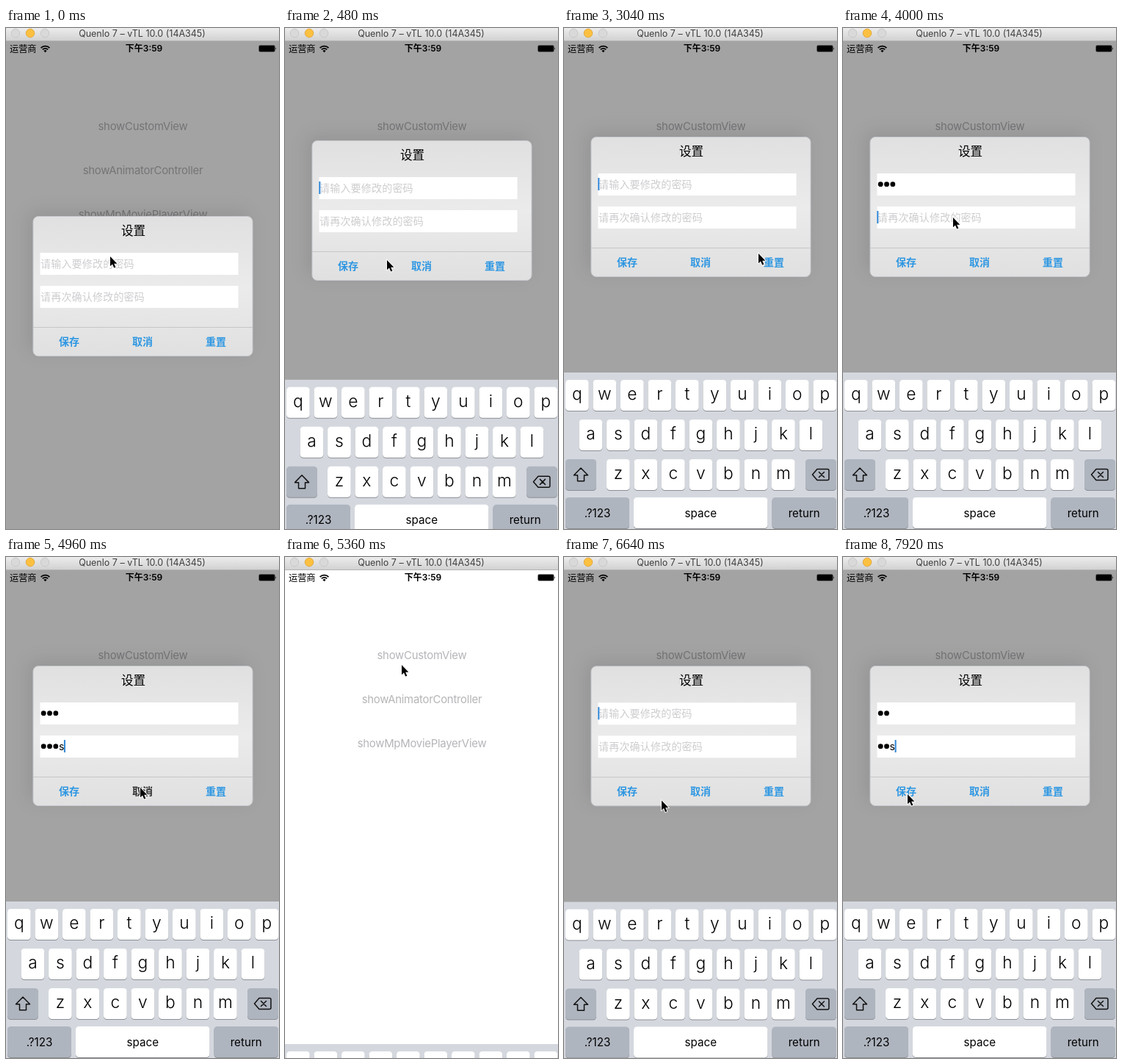
An HTML page that plays this animation: 372 px wide and 682 px high, repeating every 8000 ms.

```html
<!DOCTYPE html>
<html lang="zh-CN">
<head>
<meta charset="utf-8">
<title>Dialog demo</title>
<style>
  html, body { margin: 0; width: 100%; height: 100%; overflow: hidden; background: #fff; }
  svg { display: block; width: 100%; height: 100%; }
  text { font-family: Inter, "Noto Sans CJK SC", "Noto Sans CJK", sans-serif; white-space: pre; }
  .mid { text-anchor: middle; }
  .link { font-size: 14.9px; letter-spacing: -.25px; fill: #b5b5b9; }
  .key { font-size: 22.8px; font-weight: 350; }
  .wide { font-size: 15.2px; }
  .btn { font-size: 14px; font-weight: 700; fill: #2e97e2; }
  .hint { font-size: 14px; letter-spacing: .2px; fill: #cdcdd0; }
  .shadow { filter: blur(12px); }
  .icon { fill: none; stroke: #111; stroke-width: 1.5; stroke-linejoin: round; stroke-linecap: round; }
</style>
</head>
<body>
<svg id="stage" viewBox="0 0 372 682">
  <defs>
    <linearGradient id="bar" x2="0" y2="1">
      <stop offset="0" stop-color="#ececec"/><stop offset="1" stop-color="#d2d2d2"/>
    </linearGradient>
    <linearGradient id="panel" x2="0" y2="1">
      <stop offset="0" stop-color="#e0e0e0"/><stop offset=".5" stop-color="#ebebeb"/>
      <stop offset="1" stop-color="#e0e0e0"/>
    </linearGradient>
  </defs>
  <rect width="372" height="682" fill="#fff"/>
  <g id="links"></g>
  <rect id="dim" y="17" width="372" height="665"/>

  <g id="status">
    <text x="5" y="32.5" font-size="12.2">运营商</text>
    <g fill="none" stroke="#000" stroke-width="1.8">
      <path d="M47.6 27.2A8.2 8.2 0 0 1 59.4 27.2"/>
      <path d="M49.8 29.4A5.2 5.2 0 0 1 57.2 29.4"/>
    </g>
    <path d="M53.5 33.2L51.4 31A3 3 0 0 1 55.6 31Z"/>
    <text class="mid" x="188" y="32.3" font-size="12" font-weight="600">下午3:59</text>
    <rect x="344.5" y="23.5" width="22" height="9" rx="2" fill="none" stroke="#000" stroke-opacity=".5" stroke-width=".8"/>
    <rect x="345" y="24" width="21" height="8" rx="1.2"/>
    <path d="M367.3 26.3Q369 28 367.3 29.7Z"/>
  </g>

  <g id="dialog">
    <rect class="shadow" x="31" y="250" width="299" height="190" rx="7" fill-opacity=".09"/>
    <rect x="37" y="256.5" width="299" height="190" rx="7" fill="url(#panel)" stroke="#c8cad0"/>
    <text class="mid" x="173.5" y="282" font-size="16.6">设置</text>
    <g id="fields"></g>
    <rect id="caret" width="2" height="17" fill="#2f86d6"/>
    <rect x="37" y="407" width="299" height="1" fill="#c6c6c6"/>
    <g id="buttons"></g>
  </g>

  <g id="board"></g>

  <rect width="372" height="17" fill="url(#bar)"/>
  <rect y="17" width="372" height="1" fill="#b4b4b4"/>
  <g stroke-width=".8">
    <circle cx="13" cy="7" r="5.8" fill="#d9d9d9" stroke="#c3c3c3"/>
    <circle cx="33" cy="7" r="5.8" fill="#fcc041" stroke="#dfa12f"/>
    <circle cx="53" cy="7" r="5.8" fill="#d9d9d9" stroke="#c3c3c3"/>
  </g>
  <text class="mid" x="185.5" y="11.6" font-size="12.5" fill="#3f3f3f">Quenlo 7 – vTL 10.0 (14A345)</text>

  <path id="mouse" d="M0 0V13.2L3 10.5L5.2 15.6L7.4 14.7L5.2 9.7H9.4Z" stroke="#fff" stroke-width="1.6" paint-order="stroke"/>
</svg>
<script>
const LOOP = 8000, STEP = 80;
const LIFT = 108, BOARD = 213;
const OPEN = 5600, CLOSE = 5010, FADE = 200;
const RISE = [215, 6190], FALL = 5139;

// [time, field], -1 for none
const focusAt = [[0, -1], [215, 0], [4000, 1], [5139, -1], [6190, 0], [7200, 1]];
const typing = [
  [[3440, 3560, 3680], [4240, 4360, 4480, 4640]],
  [[6720, 6880], [7360, 7480, 7600]]
];
// [time, x, y]
const path = [
  [0, 142, 311], [200, 142, 311], [480, 139, 316], [1200, 139, 316],
  [2900, 265, 307], [3300, 265, 307], [3900, 150, 258], [4500, 150, 258],
  [4880, 183, 314], [5060, 183, 314], [5360, 159, 147], [5460, 160, 136],
  [5640, 160, 136], [6000, 133, 333], [7000, 133, 331], [7180, 120, 262],
  [7600, 120, 262], [7880, 88, 323], [8000, 88, 323]
];

const $ = id => document.getElementById(id);
function add(parent, tag, attrs, text) {
  const el = document.createElementNS("http://www.w3.org/2000/svg", tag);
  for (const k in attrs) el.setAttribute(k, attrs[k]);
  if (text) el.textContent = text;
  return parent.appendChild(el);
}
const set = (el, k, v) => el.setAttribute(k, v);

["showCustomView", "showAnimatorController", "showMpMoviePlayerView"].forEach((s, i) =>
  add($("links"), "text", { class: "link mid", x: 186.5, y: 138.5 + 60 * i }, s));

const buttons = ["保存", "取消", "重置"].map((s, i) =>
  add($("buttons"), "text", { class: "btn mid", x: 86 + 100 * i, y: 432 }, s));

const fields = ["请输入要修改的密码", "请再次确认修改的密码"].map((s, i) => {
  const g = add($("fields"), "g", { transform: `translate(46.5 ${306 + 45 * i})` });
  add(g, "rect", { width: 270, height: 30, fill: "#fff" });
  return {
    hint: add(g, "text", { class: "hint", x: .5, y: 20 }, s),
    dots: [0, 1, 2, 3].map(n => add(g, "circle", { cx: 4.7 + 8.3 * n, cy: 14.7, r: 3.4 })),
    last: add(g, "text", { y: 19.5, "font-size": 14 }, "s")
  };
});

function key(x, y, w, label, cls, fill = "#fff") {
  const g = $("board");
  add(g, "rect", { x, y: y + 1, width: w, height: 42, rx: 4.5, fill: "#8b8e94" });
  add(g, "rect", { x, y, width: w, height: 42, rx: 4.5, fill });
  if (label) add(g, "text", { class: cls + " mid", x: x + w / 2, y: y + (cls === "key" ? 27 : 26.5) }, label);
}
add($("board"), "rect", { y: 469, width: 372, height: 213, fill: "#d4d8de" });
[["qwertyuiop", 2], ["asdfghjkl", 20.6], ["zxcvbnm", 58]].forEach(([row, x], r) =>
  [...row].forEach((c, i) => key(x + 37.5 * i, 479 + 54 * r, 31.7, c, "key")));
const grey = "#afb5bf";
key(2, 587, 42, "", "", grey);
key(329, 587, 42, "", "", grey);
key(2, 639, 87, ".?123", "wide", grey);
key(95, 639, 182.5, "space", "wide");
key(283.5, 639, 87.5, "return", "wide", grey);
[
  "M23 599L13.5 608.8H18.5V616.8H27.5V608.8H32.5Z",
  "M345 600.5H359Q361 600.5 361 602.5V613.5Q361 615.5 359 615.5H345L338.5 608Z",
  "M347.5 604.5L354.5 611.5M354.5 604.5L347.5 611.5"
].forEach(d => add($("board"), "path", { class: "icon", d }));

const clamp = u => Math.max(0, Math.min(1, u));
const ease = u => { u = clamp(u); return u * u * (3 - 2 * u); };
const spring = ms => {
  const u = Math.max(0, ms) * .01826;
  return 1 - (1 + u) * Math.exp(-u);
};

function mouseAt(t) {
  const i = Math.max(1, path.findIndex(p => p[0] >= t));
  const [t0, x0, y0] = path[i - 1], [t1, x1, y1] = path[i];
  const u = ease((t - t0) / (t1 - t0));
  return [x0 + (x1 - x0) * u, y0 + (y1 - y0) * u];
}

function draw(t) {
  const again = t >= OPEN;
  const up = spring(t - RISE[again ? 1 : 0]);
  const boardUp = again ? up : up * (1 - spring(t - FALL));
  set($("board"), "transform", `translate(0 ${BOARD * (1 - boardUp)})`);

  const shown = again ? ease((t - OPEN) / FADE) : 1 - ease((t - CLOSE) / FADE);
  const scale = again ? 1.3 - .3 * shown : .6 + .4 * shown;
  const alpha = again ? .5 + .5 * shown : shown;
  set($("dim"), "opacity", .36 * shown);
  set($("dialog"), "opacity", alpha);
  set($("dialog"), "transform",
    `translate(186.5 ${351.5 - LIFT * up}) scale(${scale}) translate(-186.5 -351.5)`);

  const [since, focus] = focusAt.filter(f => f[0] <= t).pop();
  let active = since;
  fields.forEach((f, i) => {
    const hits = typing[again ? 1 : 0][i].filter(k => k <= t);
    const n = hits.length, open = focus === i && n > 0;
    const dots = open ? n - 1 : n;
    set(f.hint, "opacity", n ? 0 : 1);
    f.dots.forEach((d, k) => set(d, "opacity", k < dots ? 1 : 0));
    set(f.last, "opacity", open ? 1 : 0);
    set(f.last, "x", .5 + 8.3 * dots);
    if (focus === i) {
      if (n) active = Math.max(active, hits[n - 1]);
      set($("caret"), "x", 46.3 + (open ? 8.3 * dots + 7.7 : 0));
      set($("caret"), "y", 312 + 45 * i);
    }
  });
  set($("caret"), "opacity", focus >= 0 && (t - active) % 900 < 520 ? 1 : 0);
  buttons[1].style.fill = t >= 4920 && t < CLOSE + FADE ? "#333" : "";

  const [x, y] = mouseAt(t);
  set($("mouse"), "transform", `translate(${x} ${y})`);
}

const start = performance.now();
function tick() {
  const t = (performance.now() - start) % LOOP;
  draw(Math.floor(t / STEP) * STEP);
  requestAnimationFrame(tick);
}
tick();
</script>
</body>
</html>
```
